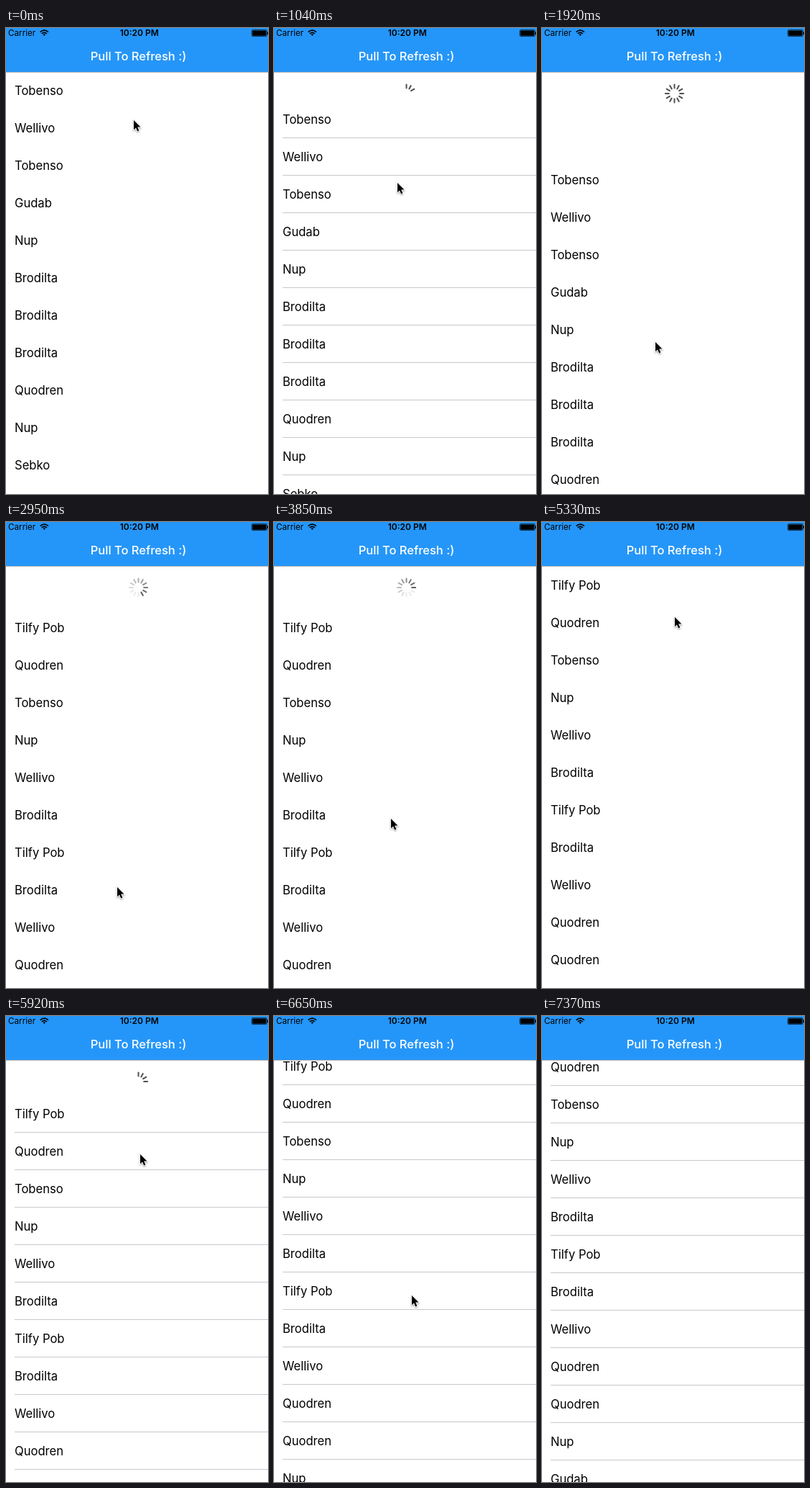
An HTML page that plays this animation: 365x647 px, repeating every 7.47 s.

```html
<!DOCTYPE html>
<html lang="en">
<head>
<meta charset="utf-8">
<title>Pull To Refresh</title>
<style>
  html, body { margin: 0; width: 100%; height: 100%; overflow: hidden; background: #fff; }
  svg { display: block; width: 365px; height: 647px; font-family: Inter, Roboto, "Liberation Sans", sans-serif; }
</style>
</head>
<body>
<svg viewBox="0 0 365 647">
  <rect width="365" height="647" fill="#fff"/>
  <g id="spinner" transform="translate(184.5 91)"></g>
  <g id="list">
    <rect y="61" width="365" height="900" fill="#fff"/>
    <g id="rows" font-size="16.6"></g>
    <g id="lines" fill="#c8c7cc"></g>
  </g>
  <g id="header">
    <rect width="365" height="61" fill="#2596f9"/>
    <rect y="61" width="365" height="1" opacity=".3"/>
    <text x="3" y="11.3" font-size="11.7">Carrier</text>
    <g fill="none" stroke="#000" stroke-width="1.6">
      <path d="M47.6 5.6Q53.3 .6 59 5.6M49.7 7.9Q53.3 4.9 56.9 7.9"/>
      <path d="M51.5 9L53.3 11L55.1 9Q53.3 7.7 51.5 9Z" fill="#000" stroke="none"/>
    </g>
    <text x="185.7" y="11.4" font-size="12" font-weight="600" text-anchor="middle">10:20 PM</text>
    <rect x="342.4" y="2.6" width="21" height="9" rx="1.6" fill="none" stroke="#000" stroke-width=".7"/>
    <rect x="343.3" y="3.5" width="19.2" height="7.2" rx=".8"/>
    <rect x="364" y="5.4" width="1" height="3.6"/>
    <text x="184.5" y="45" font-size="16.5" font-weight="500" fill="#fff" text-anchor="middle">Pull To Refresh :)</text>
  </g>
  <path id="cursor" d="M0 0V13.2L3 10.4L5.2 15.4L7.3 14.5L5.2 9.6H9.5Z" stroke="#fff" stroke-width="1.6" paint-order="stroke"
        style="filter: drop-shadow(0 1px 1px #0006)"/>
</svg>
<script>
const LOOP = 7470, TICK = 147.8, LEAD = 21, LAST = 50;
const ROW = 52, FIRST_CENTER = 87;
const SPIN_START = 14, RELOAD = 19, REFRESHED = 26;
const REFRESH_HEIGHT = 60, REFRESH_PULL = 100;

const before = "Tobenso,Wellivo,Tobenso,Gudab,Nup,Brodilta,Brodilta,Brodilta,Quodren,Nup,Sebko".split(",");
const after = "Tilfy Pob,Quodren,Tobenso,Nup,Wellivo,Brodilta,Tilfy Pob,Brodilta,Wellivo,Quodren,Quodren,Nup,Gudab".split(",");

// The pointer eases between these stops; the list follows while it is held.
const stops = [
  { at: 2.2, x: 178, y: 128 }, { at: 17.3, x: 154, y: 507 },
  { at: 25, x: 156, y: 507 }, { at: 28, x: 183, y: 128 },
  { at: 29, x: 183, y: 128 }, { at: 34, x: 180, y: 279 },
  { at: 37, x: 186, y: 83 }, { at: 42, x: 188, y: 250 },
  { at: 44, x: 192, y: 405 }, { at: 47, x: 193, y: 337 },
  { at: 50, x: 340, y: 660 }
];
const pulls = [{ press: 2.2, release: 16.5 }, { press: 29, release: 34 }, { press: 37, release: 42 }];
const scroll = { press: 44, release: 47 };

const $ = id => document.getElementById(id);
const mod = (value, size) => ((value % size) + size) % size;
const ease = u => (1 - Math.cos(Math.PI * u)) / 2;
const settle = (from, to, elapsed) => to + (from - to) * Math.exp(-2.2 * elapsed);
const rubberBand = travel => travel / (2.09 + travel / 795);

function add(parent, tag, attrs) {
  const node = document.createElementNS("http://www.w3.org/2000/svg", tag);
  for (const key in attrs) node.setAttribute(key, attrs[key]);
  return parent.appendChild(node);
}

const rows = after.map((_, i) => {
  const center = FIRST_CENTER + i * ROW;
  add($("lines"), "rect", { x: 12, y: center + 25, width: 353, height: 1 });
  return add($("rows"), "text", { x: 12, y: center + 6 });
});
const spokes = Array.from({ length: 12 }, (_, i) => add($("spinner"), "rect", {
  x: -1, y: -13.6, width: 2, height: 7, rx: 1, fill: "#505050", transform: `rotate(${i * 30})`
}));

function cursorAt(tick) {
  const next = stops.findIndex(stop => stop.at >= tick);
  if (next <= 0) return stops[0];
  const a = stops[next - 1], b = stops[next];
  const u = ease((tick - a.at) / (b.at - a.at));
  return { x: a.x + (b.x - a.x) * u, y: a.y + (b.y - a.y) * u };
}

const dragged = ({ press, release }, tick) =>
  cursorAt(Math.min(tick, release)).y - cursorAt(press).y;

function offsetAt(tick) {
  if (tick >= scroll.press) return dragged(scroll, tick);
  const pull = pulls.filter(p => p.press <= tick).pop();
  if (!pull) return 0;
  const held = rubberBand(dragged(pull, tick));
  if (tick <= pull.release) return held;
  if (held < REFRESH_PULL) return settle(held, 0, tick - pull.release);
  return tick < REFRESHED
    ? settle(held, REFRESH_HEIGHT, tick - pull.release)
    : settle(REFRESH_HEIGHT, 0, tick - REFRESHED);
}

// Downscaling keeps the one-pixel separators only at some scroll phases.
function linesVisible(offset) {
  const phase = mod(offset, 7.3);
  return phase > 3 && phase < 5.8;
}

function drawSpinner(tick, offset) {
  const spinning = tick >= SPIN_START && tick <= REFRESHED + 1;
  const shown = Math.floor((offset - 25) / 5);
  const leader = 5 + Math.floor((tick - 20) * TICK * 12 / 1000);
  spokes.forEach((spoke, i) => {
    const fade = Math.max(0.12, 0.92 - mod(leader - i, 12) * 0.09);
    spoke.setAttribute("opacity", spinning ? fade : i < shown ? 1 : 0);
  });
}

function draw(time) {
  const tick = Math.min(LAST, Math.floor((time + LEAD) / TICK));
  const offset = Math.round(offsetAt(tick));
  const { x, y } = cursorAt(tick);
  const names = tick < RELOAD ? before : after;
  rows.forEach((row, i) => { row.textContent = names[i] || ""; });
  $("list").setAttribute("transform", `translate(0 ${offset})`);
  $("lines").setAttribute("visibility", linesVisible(offset) ? "visible" : "hidden");
  $("cursor").setAttribute("transform", `translate(${Math.round(x)} ${Math.round(y)})`);
  drawSpinner(tick, offset);
}

const start = performance.now();
function loop() {
  draw((performance.now() - start) % LOOP);
  requestAnimationFrame(loop);
}
loop();
</script>
</body>
</html>
```
